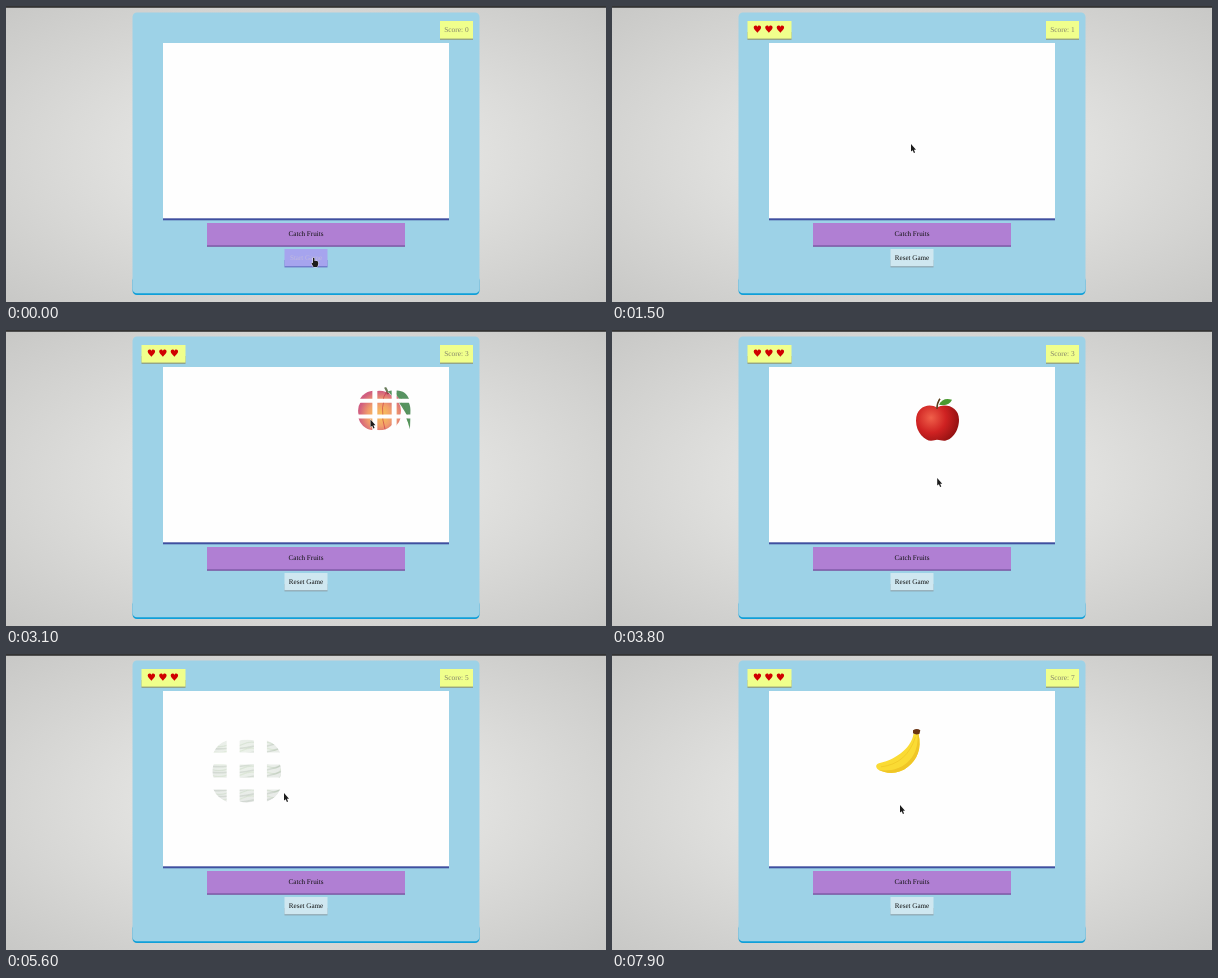
Write an HTML page with a canvas that moves like this. It is 600 px wide and 296 px high and loops after 8000 ms.

```html
<!DOCTYPE html>
<html lang="en">
<head>
<meta charset="utf-8">
<title>Catch Fruits</title>
<style>
  html, body { margin: 0; width: 100%; height: 100%; overflow: hidden; }
  body { background: radial-gradient(#f2f2f0, #c8c8c6); }
  svg, canvas { position: absolute; left: 0; top: 0; width: 600px; height: 296px; }
  text {
    font: 7.1px "Liberation Serif", "Times New Roman", serif;
    text-anchor: middle;
    text-rendering: geometricPrecision;
  }
</style>
</head>
<body>
<svg viewBox="0 0 600 296">
  <rect width="600" height="1.8" fill="#333"/>
  <rect x="126.5" y="270" width="347" height="19" rx="4.4" fill="#109fd8"/>
  <rect x="126.5" y="6.5" width="347" height="280.8" rx="4.4" fill="#9dd2e7"/>

  <g id="lives">
    <rect x="135.5" y="26" width="44" height="7.8" fill="#8f9a78"/>
    <rect x="135.5" y="15" width="44" height="17.6" fill="#f0ff8c"/>
    <g fill="#d00000">
      <path id="heart" d="M145.400 26.800C143.700 24.500 141.700 23.600 141.700 21.600C141.700 19 144.800 18.800 145.400 20.900C146 18.800 149.100 19 149.100 21.600C149.100 23.600 147.100 24.500 145.400 26.800Z"/>
      <use href="#heart" x="11.5"/>
      <use href="#heart" x="23"/>
    </g>
  </g>

  <rect x="434" y="26" width="33" height="7.8" fill="#8f9a78"/>
  <rect x="434" y="15" width="33" height="17.6" fill="#f0ff8c"/>
  <text id="score" x="450.4" y="25.8" fill="#85856a" style="font-size:7.4px">Score: 0</text>

  <rect x="157" y="205" width="286" height="9.3" fill="#3f4f9f"/>
  <rect x="157" y="37" width="286" height="175.3" fill="#fefefe"/>

  <rect x="201" y="230" width="198" height="10.8" fill="#7c58a4"/>
  <rect x="201" y="217" width="198" height="22.3" fill="#b07fd3"/>
  <text x="300" y="230" fill="#111">Catch Fruits</text>

  <rect id="shade" x="278.5" y="254" width="43" height="7.4"/>
  <rect id="button" x="278.5" y="243" width="43" height="17.2"/>
  <text id="label" x="300" y="254" fill="#111">Start Game</text>
</svg>
<canvas id="stage"></canvas>
<script>
const LOOP = 8000, FRAME = 100, BURST = 500, TOP = 15;
const byId = id => document.getElementById(id);
const canvas = byId('stage'), ctx = canvas.getContext('2d');
const ratio = window.devicePixelRatio || 1;
canvas.width = 600 * ratio;
canvas.height = 296 * ratio;

// fruit, left edge, start, catch, speed in px per ms
const drops = [
  ['apple', 296, 100, 1000, .132],
  ['orange', 316, 1510, 2050, .132],
  ['peach', 357, 2550, 2900, .132],
  ['apple', 304, 3400, 4090, .132],
  ['melon', 219.3, 4590, 5200, .135],
  ['orange', 310, 5700, 6160, .176],
  ['pear', 375, 6660, 7060, .176],
  ['banana', 264, 7560, 9000, .176]
];

// time, x, y of the pointer tip
const track = [
  [0, 307, 252], [900, 307, 252], [1000, 301, 165], [1100, 300, 150], [1500, 299, 138],
  [1900, 304, 140], [2050, 325, 122], [2300, 345, 120], [2700, 360, 112], [2900, 364, 94],
  [3100, 364.5, 89.5], [3600, 330, 148], [4100, 318, 148], [4300, 305, 158], [4600, 290, 148],
  [5000, 278, 146], [5200, 261, 133], [5600, 278, 139], [6160, 320, 125], [6300, 330, 128],
  [6700, 385, 142], [7000, 393.5, 146], [7200, 393, 162], [7900, 288, 151]
];

function fill(d, color) {
  ctx.fillStyle = color;
  ctx.fill(new Path2D(d));
}

function line(d, color, width) {
  ctx.strokeStyle = color;
  ctx.lineWidth = width;
  ctx.stroke(new Path2D(d));
}

function glow(x, y, r, ...colors) {
  const g = ctx.createRadialGradient(x, y, 0, x, y, r);
  colors.forEach((c, i) => g.addColorStop(i / (colors.length - 1), c));
  return g;
}

function oval(x, y, rx, ry, color) {
  ctx.beginPath();
  ctx.ellipse(x, y, rx, ry, 0, 0, 7);
  ctx.fillStyle = color;
  ctx.fill();
}

const fruits = {
  apple: { w: 43, h: 43, draw() {
    fill('M21 10C14 5 0 8 0 23C0 35 9 43 15 43C18 43 19 42 21 42C24 42 25 43 28 43C35 43 43 34 43 22C43 8 28 5 21 10Z',
      glow(15, 20, 30, '#f0604a', '#cf2222', '#8c1010'));
    line('M21 11Q21 5 24 1', '#5a3a18', 1.6);
    fill('M23 7Q27 -1 36 2Q33 9 23 7Z', '#4a9a30');
  } },
  orange: { w: 43, h: 43, draw() {
    oval(21.5, 22, 21.5, 21, glow(16, 16, 30, '#ffc050', '#f69a1c', '#d87008'));
    fill('M20 4Q24 -1 32 1Q29 7 20 4Z', '#3f8a2c');
  } },
  peach: { w: 43, h: 35, draw() {
    line('M25 7Q24 3 22 0', '#1c3a08', 2.2);
    oval(16.5, 19.3, 16.5, 15.7, glow(19, 22, 18, '#f5a300', '#ea6a1c', '#b8083c'));
    line('M24 4Q16 14 22 34', '#c02040', .8);
    fill('M25 4C36 1 43 10 42.5 20Q42.3 27 42 34Q40 25 36 19Q32 12 25 4Z', '#005a10');
    line('M27 5Q38 12 41.5 31', '#4f9a40', .6);
  } },
  melon: { w: 43, h: 39.4, draw() {
    ctx.save();
    ctx.beginPath();
    ctx.ellipse(21.5, 19.7, 21.5, 19.7, 0, 0, 7);
    ctx.clip();
    oval(21.5, 19.7, 22, 20, glow(20, 12, 27, '#3d7a2a', '#27591f', '#0f2c10'));
    for (let i = 0; i < 6; i++) {
      const y = 2 + i * 6;
      line(`M-1 ${y + 4}Q8 ${y + 7} 17 ${y + 3}T33 ${y + 2}T44 ${y - 4}`, i % 2 ? '#5d9a3c' : '#46842f', 1.3);
      line(`M-1 ${y + 7}Q20 ${y + 9} 44 ${y}`, '#12330f', 1.6);
    }
    ctx.restore();
  } },
  pear: { w: 44, h: 62, draw() {
    const body = 'M31 8.5C38 7 43.3 12 43 19C42.5 26 38.5 30 41 36C46 48 37 61 23 61C9 61 .8 53 .8 42C.8 32 7 26 14 23.500C20 21 19 10 31 8.5Z';
    fill(body, glow(10, 36, 38, '#ebdc90', '#e0bc4c', '#d0a01c'));
    line(body, '#5c4c10', 1.7);
    line('M34.5 9Q36 5 38.5 2.500', '#5c4c10', 2.2);
    line('M36.5 .8L41 4', '#5c4c10', 2);
    line('M11 54.5L18 57.5M13 58L15 54.5', '#5c4c10', 1.3);
  } },
  banana: { w: 45, h: 45, draw() {
    fill('M37.5 5C36 17 23 30 3 34.5C-.8 35.5 -.5 39 2.500 41C12 46 24 45 32 38C41 31 46 20 42.5 5Z', '#fadb34');
    fill('M2 41C12 43 23 41 31 34C39 27 42.5 17 41.5 5L42.5 5C46 20 41 31 32 38C24 45 12 46 2 41Z', '#f0c626');
    line('M5 38Q31 35 39.5 8', '#f0c828', .8);
    fill('M37 1.5Q41 -1 44.3 1.5L43.5 5Q40 6.5 37 4.5Z', '#6a3412');
  } }
};

function drawWhole(fruit, x, y) {
  ctx.save();
  ctx.beginPath();
  ctx.rect(157, 37, 286, 175.3);
  ctx.clip();
  ctx.translate(x, y);
  fruit.draw();
  ctx.restore();
}

// nine pieces drift apart and fade
function drawBurst(fruit, x, y, p) {
  const w = fruit.w / 3, h = fruit.h / 3;
  for (let row = 0; row < 3; row++) {
    for (let col = 0; col < 3; col++) {
      ctx.save();
      ctx.globalAlpha = 1 - p;
      ctx.translate(x + (col - 1) * w * p, y + (row - 1) * h * p);
      ctx.beginPath();
      ctx.rect(col * w, row * h, w, h);
      ctx.clip();
      fruit.draw();
      ctx.restore();
    }
  }
}

function pointAt(t) {
  const i = track.findIndex(k => k[0] > t);
  if (i < 0) return track[track.length - 1].slice(1);
  const [t0, x0, y0] = track[i - 1], [t1, x1, y1] = track[i];
  const p = (t - t0) / (t1 - t0);
  return [x0 + (x1 - x0) * p, y0 + (y1 - y0) * p];
}

function drawPointer(t, hand) {
  const [x, y] = pointAt(t);
  const d = hand
    ? 'M0 0Q1 -.7 1.5 .5V3Q3 2.3 5 3.6L5.3 6L4.3 9H.5L-1.5 5.5Q-1 4.3 0 5Z'
    : 'M0 0V7.6L1.7 6.2L2.9 9L4.1 8.4L2.9 5.8H5Z';
  ctx.save();
  ctx.translate(x, y);
  line(d, 'rgba(255,255,255,.8)', 1);
  fill(d, '#1c1c1c');
  ctx.restore();
}

function render(t) {
  const started = t >= 100, hover = t < 1000;
  byId('lives').style.display = started ? '' : 'none';
  byId('score').textContent = 'Score: ' + drops.filter(d => d[3] <= t).length;
  byId('label').textContent = started ? 'Reset Game' : 'Start Game';
  byId('label').setAttribute('fill', hover ? '#c2b9dc' : '#111');
  byId('button').setAttribute('fill', hover ? '#a6a4ee' : '#cfe7f0');
  byId('shade').setAttribute('fill', hover ? '#6672c4' : '#8ba3ad');

  ctx.setTransform(ratio, 0, 0, ratio, 0, 0);
  ctx.clearRect(0, 0, 600, 296);
  for (const [name, x, start, caught, speed] of drops) {
    if (t < start || t >= caught + BURST) continue;
    const y = TOP + speed * (Math.min(t, caught) - start);
    if (t < caught) drawWhole(fruits[name], x, y);
    else drawBurst(fruits[name], x, y, .5 - Math.cos((t - caught) / BURST * Math.PI) / 2);
  }
  drawPointer(t, hover);
}

const begin = performance.now();
function tick() {
  const t = (performance.now() - begin) % LOOP;
  render(Math.floor(t / FRAME) * FRAME);
  requestAnimationFrame(tick);
}
tick();
</script>
</body>
</html>
```
